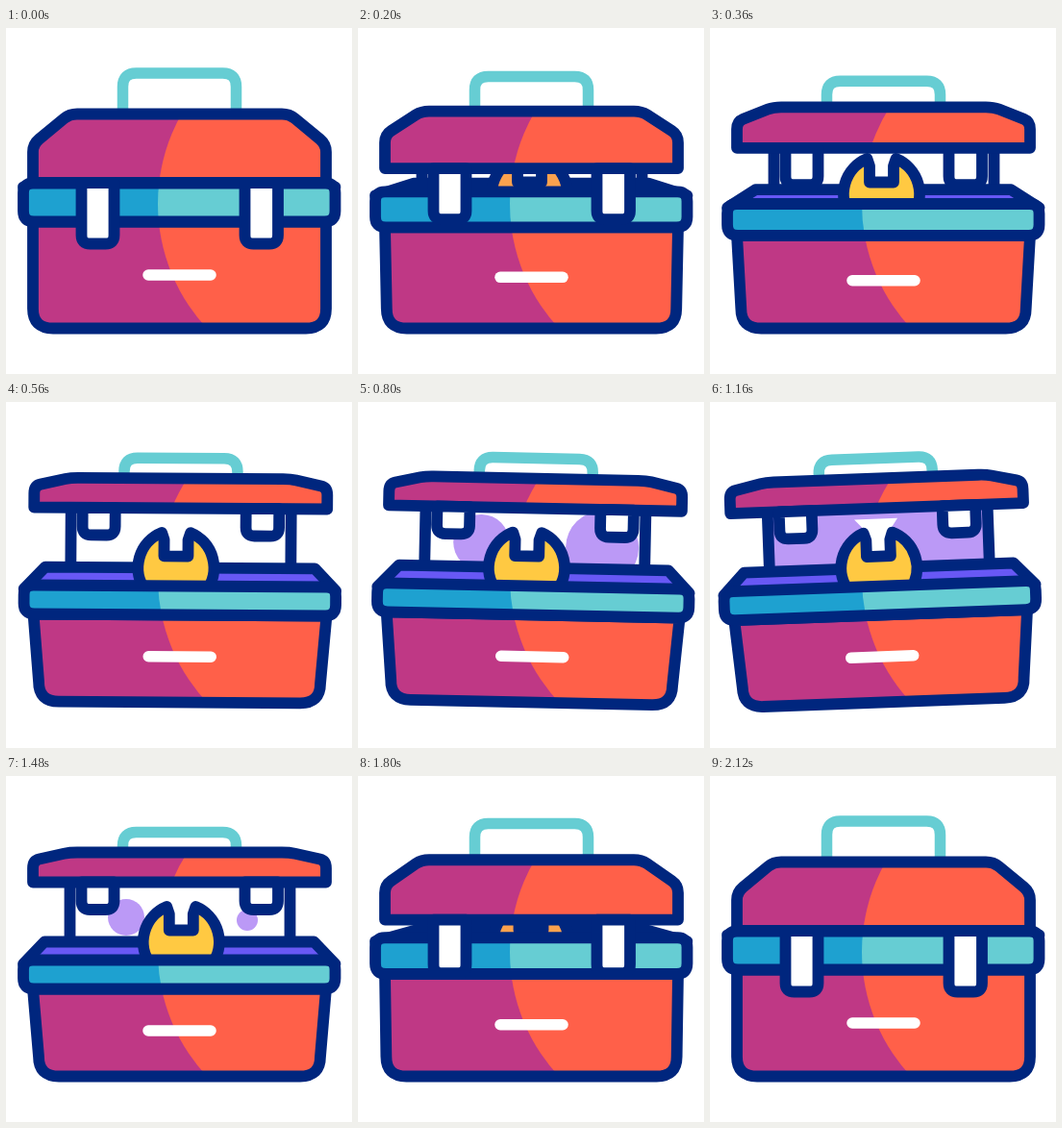
These frames come from a looping animation (360 px wide and 360 px high, 2520 ms). An HTML page:

```html
<!DOCTYPE html>
<html lang="en">
<head>
<meta charset="utf-8">
<title>Toolbox</title>
<style>
  html, body { margin: 0; width: 100%; height: 100%; overflow: hidden; background: #fff; }
  svg { display: block; width: 100vw; height: 100vh; }
  .line { fill: none; stroke: #00267e; stroke-width: 11.8; stroke-linejoin: round; stroke-linecap: round; }
</style>
</head>
<body>
<svg viewBox="0 0 360 360">
  <defs>
    <clipPath id="lidClip"><path data-shape="lid"/></clipPath>
    <clipPath id="bandClip"><path data-shape="band"/></clipPath>
    <clipPath id="bodyClip"><path data-shape="body"/></clipPath>
    <clipPath id="backClip"><path data-shape="back"/></clipPath>
  </defs>
  <g id="box">
    <path data-shape="handle" fill="none" stroke="#66cdd3" stroke-width="11.5"/>
    <g clip-path="url(#backClip)" fill="#bb99f6">
      <circle id="glowLeft" cx="125" cy="147"/>
      <circle id="glowRight" cx="251" cy="150"/>
    </g>
    <path class="line" data-shape="posts"/>
    <path class="line" data-shape="tray" style="fill:#6858f5"/>
    <g id="wrench">
      <path fill="#fff" d="M-24-51H21L12-38V-12H-12V-38Z"/>
      <path id="jaw" class="line" d="M-15-36.5L-12.5-29V-12H12.5V-29L15-36.5A39.5 39.5 0 1 1-15-36.5Z"/>
    </g>
    <g clip-path="url(#bodyClip)">
      <path fill="#bf3885" d="M0 0H360V360H0Z"/>
      <circle class="lit" cx="348" cy="183" r="190" fill="#ff6049"/>
    </g>
    <path class="line" data-shape="body"/>
    <path id="label" d="M148 0H213" stroke="#fff" stroke-width="11.5" stroke-linecap="round"/>
    <g clip-path="url(#bandClip)">
      <path fill="#1ea1d0" d="M0 0H360V360H0Z"/>
      <circle class="lit" cx="348" cy="183" r="190" fill="#66cdd3"/>
    </g>
    <path class="line" data-shape="band"/>
    <g clip-path="url(#lidClip)">
      <path fill="#bf3885" d="M0 0H360V360H0Z"/>
      <circle class="lit" cx="348" cy="183" r="190" fill="#ff6049"/>
    </g>
    <path class="line" data-shape="lid"/>
    <path class="line" data-shape="latches" style="fill:#fff"/>
  </g>
</svg>
<script>
const LOOP = 2520, STEP = 40, END = 2120;
const byId = id => document.getElementById(id);
const mix = (a, b, k) => a + (b - a) * k;
const smooth = k => k * k * (3 - 2 * k);

// Eased value through [time, value] keys.
function track(keys, t) {
  if (t <= keys[0][0]) return keys[0][1];
  for (let i = 1; i < keys.length; i++) {
    const [t0, a] = keys[i - 1], [t1, b] = keys[i];
    if (t <= t1) return mix(a, b, smooth((t - t0) / (t1 - t0)));
  }
  return keys[keys.length - 1][1];
}

const OPEN = [[0, 0], [555, 1], [1480, 1], [1942, 0]];
const TILT = [[530, 0], [645, 2.2], [1140, -2.1], [1460, 0]];
const SLIDE = [[360, 178.5], [800, 172.8], [1160, 180.5], [1480, 182.3], [1800, 180]];
const GLOW_LEFT = [[560, 0], [800, 29], [1080, 85], [1200, 85], [1480, 19], [1540, 0]];
const GLOW_RIGHT = [[560, 0], [800, 38], [1080, 85], [1200, 85], [1480, 11], [1540, 0]];

function roundRect(x0, y0, x1, y1, top, low) {
  return `M${x0 + top} ${y0}H${x1 - top}Q${x1} ${y0} ${x1} ${y0 + top}V${y1 - low}` +
    `Q${x1} ${y1} ${x1 - low} ${y1}H${x0 + low}Q${x0} ${y1} ${x0} ${y1 - low}V${y0 + top}Q${x0} ${y0} ${x0 + top} ${y0}Z`;
}

function lidPath(top, shoulder, bottom) {
  const left = 28, right = 333, run = 38;
  const y = k => mix(shoulder, top, k);
  const round = Math.min(8, (bottom - shoulder) / 2);
  return `M${left} ${bottom}V${shoulder + round}Q${left} ${shoulder} ${left + run * .17} ${y(.17)}` +
    `L${left + run * .85} ${y(.85)}Q${left + run} ${top} ${left + run + 8} ${top}H${right - run - 8}` +
    `Q${right - run} ${top} ${right - run * .85} ${y(.85)}L${right - run * .17} ${y(.17)}` +
    `Q${right} ${shoulder} ${right} ${shoulder + round}V${bottom}Z`;
}

function bodyPath(top, inset) {
  const l = 28 + inset, r = 333 - inset;
  return `M28 ${top}L${l} 292Q${l} 312.5 ${l + 21} 312.5H${r - 21}Q${r} 312.5 ${r} 292L333 ${top}Z`;
}

function render(t) {
  const open = track(OPEN, t), tilt = track(TILT, t);
  const at = (closed, opened) => mix(closed, opened, open);
  const lidTop = at(89.5, 79.5), lidLow = at(161, 110.5);
  const bandTop = at(161.5, 191.5), bandLow = at(201.5, 221.5);
  const trayTop = at(157, 172.5), trayIn = at(66, 40), grip = at(47, 58.5);
  const latchLow = at(224.5, 139);

  const shapes = {
    handle: `M121.5 ${lidTop}V${grip + 14}Q121.5 ${grip} 135.5 ${grip}H225.5Q239.5 ${grip} 239.5 ${grip + 14}V${lidTop}`,
    back: `M67 ${lidLow}H295V${trayTop}H67Z`,
    posts: `M66.5 ${lidLow}V${trayTop}M295.5 ${lidLow}V${trayTop}`,
    tray: `M18 ${bandTop + 4}L${trayIn} ${trayTop}H${360.5 - trayIn}L342.5 ${bandTop + 4}Z`,
    body: bodyPath(bandLow, 6 * open),
    band: roundRect(18, bandTop, 342.5, bandLow, 10, 11),
    lid: lidPath(lidTop, at(121, 88), lidLow),
    latches: roundRect(78.5, lidLow, 112.5, latchLow, 0, 9) + roundRect(248.5, lidLow, 283, latchLow, 0, 9)
  };
  document.querySelectorAll("[data-shape]").forEach(el => el.setAttribute("d", shapes[el.dataset.shape]));

  byId("glowLeft").setAttribute("r", track(GLOW_LEFT, t));
  byId("glowRight").setAttribute("r", track(GLOW_RIGHT, t));
  byId("wrench").setAttribute("transform", `translate(${track(SLIDE, t)} 172.5)`);
  byId("jaw").style.fill = open < .5 ? "#fba24e" : "#ffc942";
  byId("label").setAttribute("transform", `translate(0 ${at(257, 265)})`);
  byId("box").setAttribute("transform", `rotate(${tilt} 180 300)`);
  // The light stays put while the box rocks.
  document.querySelectorAll(".lit").forEach(el => el.setAttribute("transform", `rotate(${-tilt} 180 300)`));
}

const start = performance.now();
function tick() {
  const t = (performance.now() - start) % LOOP;
  render(Math.min(END, Math.floor(t / STEP) * STEP));
  requestAnimationFrame(tick);
}
tick();
</script>
</body>
</html>
```
